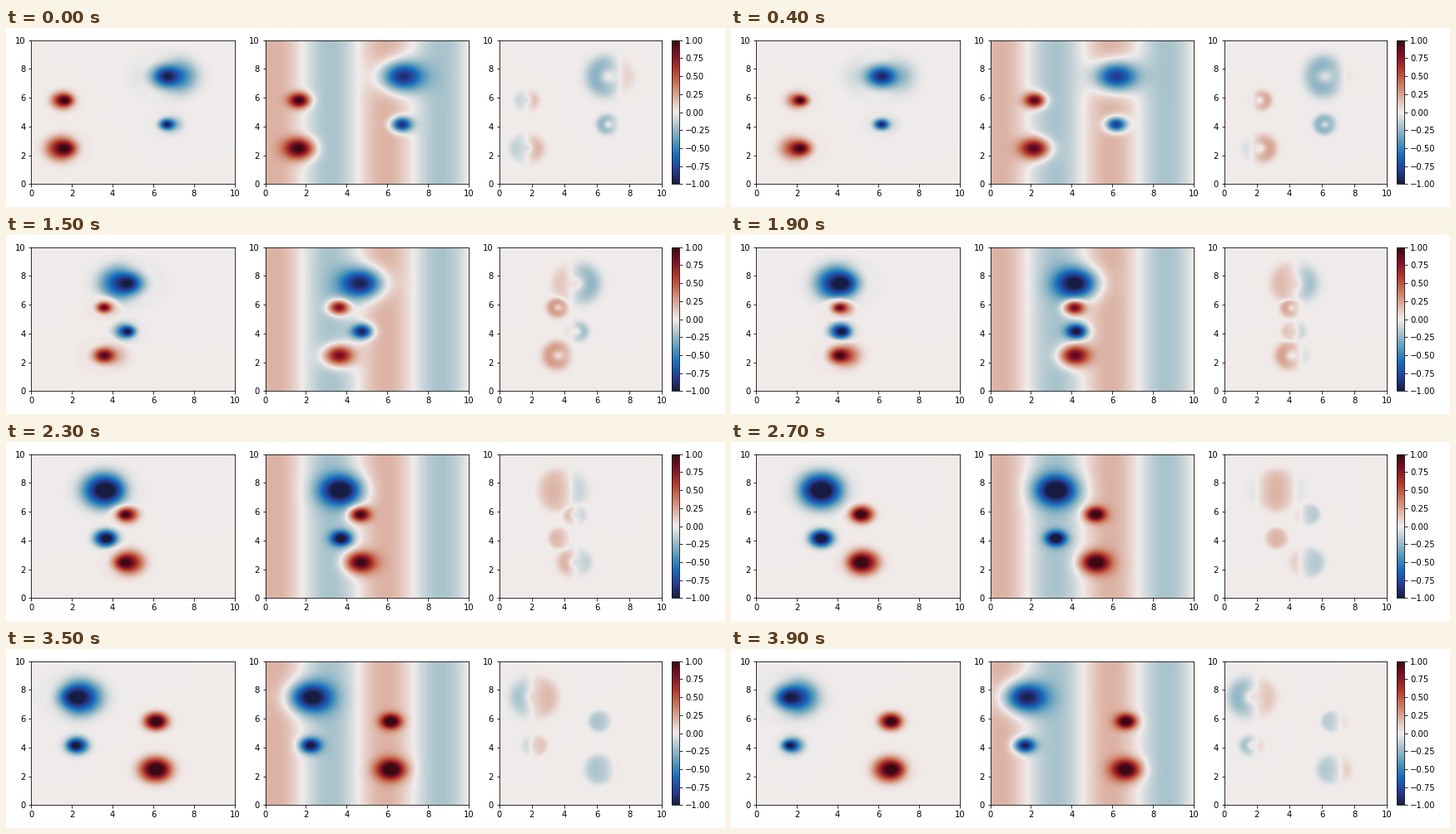
Write a matplotlib script that moves like this. It is 864 by 216 pixels and loops after 4000 ms.

```python
import numpy as np
import matplotlib.pyplot as plt
from matplotlib.animation import FuncAnimation
from matplotlib.colors import LinearSegmentedColormap

FRAMES = 40
INTERVAL = 100
NOISE = 0.2   # amplitude of the standing wave
EDGE = 0.17   # signal level below which the wave is filtered out

# dark blue - white - dark red, evenly spaced
balance = LinearSegmentedColormap.from_list("balance", [
    "#171c42", "#263e94", "#176ebc", "#5b9bbc", "#a9c3cc", "#f1eceb",
    "#dcb2a4", "#c9765b", "#b1372b", "#7d1128", "#3c0911"])

NX, NY = 245, 174
x, y = np.meshgrid((np.arange(NX) + 0.5) * 10 / NX,
                   (np.arange(NY) + 0.5) * 10 / NY)
wave = NOISE * np.cos(1.155 * (x - 0.45))


def truth(n):
    """Red blobs drift right, blue ones left, in alternating rows."""
    shift = 5 * n / (FRAMES - 1)
    field = np.zeros_like(x)
    for row, width in enumerate((0.5, 0.355, 0.355, 0.72)):
        sign = 1 if row % 2 == 0 else -1
        cx = 25 / 6 + sign * (shift - 2.5)
        cy = 2.45 + row * 5 / 3
        field += sign * np.exp(-((x - cx)**2 + (y - cy)**2) / (2 * width**2))
    return field


def fields(n):
    """Recovered signal, noisy input and remaining error."""
    signal = truth(n)
    size = np.minimum(np.abs(signal), 1)
    side = np.sign(signal)
    leak = wave * size**2 / (size**2 + EDGE**2)
    # where the wave opposes a blob, its rim shrinks and its peak is kept
    opposed = 1 / (1 + np.exp(wave * side / 0.05))
    rim = 0.4 * size * (1 - size) - 0.12 * size**5
    error = side * opposed * rim - leak
    return signal - error, signal + wave, error


fig, axes = plt.subplots(1, 3, figsize=(12, 3), dpi=72)
images = [ax.imshow(f, extent=(0, 10, 0, 10), origin="lower", aspect="auto",
                    cmap=balance, vmin=-1, vmax=1, interpolation="bilinear")
          for ax, f in zip(axes, fields(0))]
for ax in axes:
    ax.set_xticks(range(0, 11, 2))
    ax.set_yticks(range(0, 11, 2))
fig.colorbar(images[2], ax=axes[2], ticks=np.linspace(-1, 1, 9))
fig.tight_layout()
fig.subplots_adjust(right=fig.subplotpars.right + 0.0003)


def update(n):
    for image, field in zip(images, fields(n)):
        image.set_data(field)
    return images


anim = FuncAnimation(fig, update, frames=FRAMES, interval=INTERVAL,
                     repeat=True, repeat_delay=0, blit=False)
plt.show()
```
